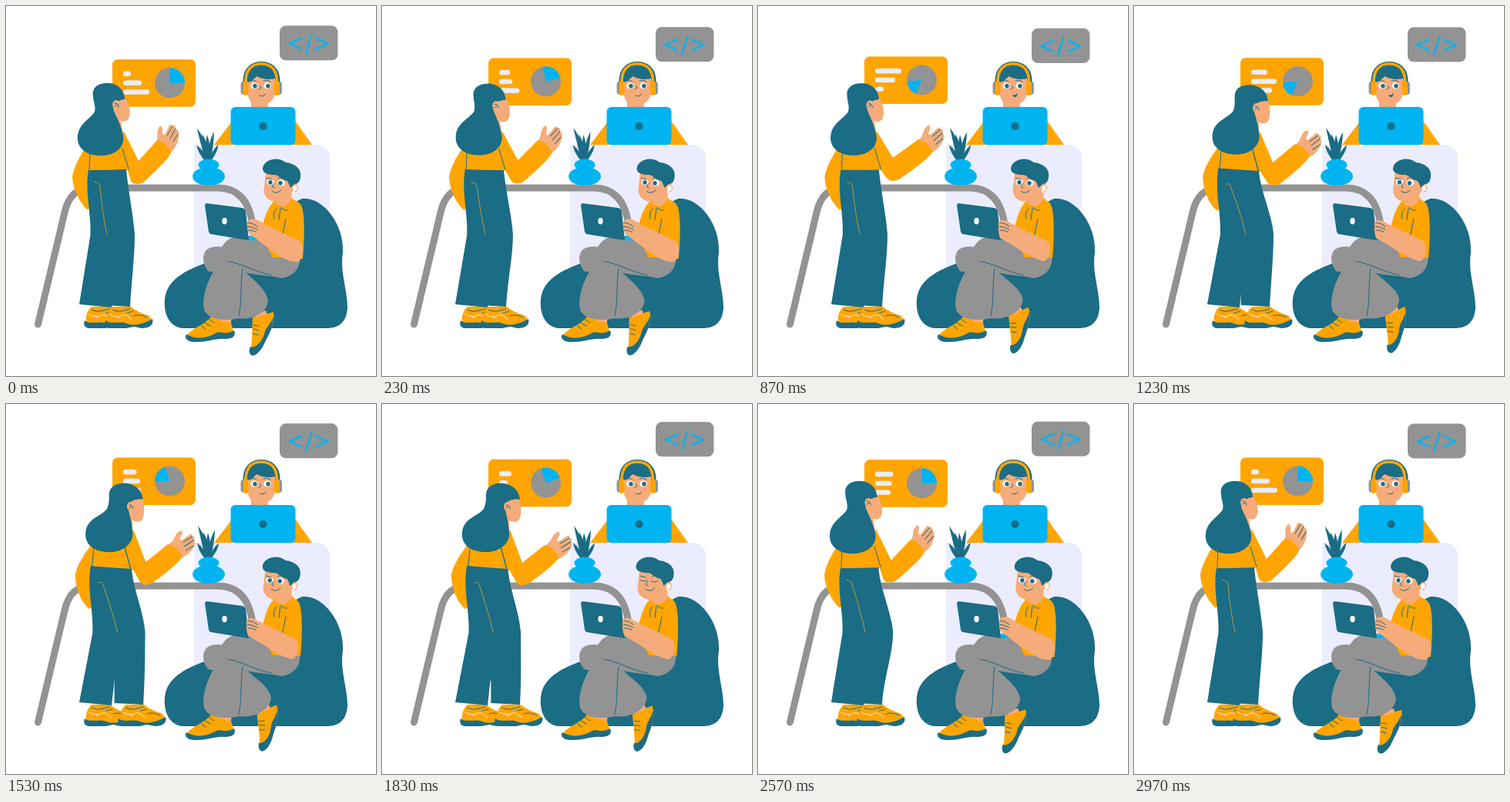
An HTML page with a canvas that plays this animation: 480 px wide and 480 px high, repeating every 3000 ms.

```html
<!DOCTYPE html>
<html>
<head>
<meta charset="utf-8">
<style>
html, body { margin: 0; width: 100%; height: 100%; overflow: hidden; background: #fff }
canvas { display: block; width: 480px; height: 480px }
</style>
</head>
<body>
<canvas id="stage" width="480" height="480"></canvas>
<script>
const ctx = document.getElementById('stage').getContext('2d');
const ORANGE = '#ffa502', TEAL = '#1b6c85', BLUE = '#00b4f2', GREY = '#939393',
      PALE = '#ebedfe', SKIN = '#f6ac7a', WHITE = '#fff';
const LOOP = 3000, TIMES = [0, 470, 870, 1230, 1830, 2230];
let t = 0;

const fill = (d, color) => { ctx.fillStyle = color; ctx.fill(new Path2D(d)); };
const line = (d, color = TEAL, w = 1) => {
  ctx.strokeStyle = color; ctx.lineWidth = w; ctx.stroke(new Path2D(d));
};
const oval = (x, y, rx, ry, color) => {
  ctx.beginPath(); ctx.ellipse(x, y, rx, ry, 0, 0, 7); ctx.fillStyle = color; ctx.fill();
};
const box = (x, y, w, h, r, color) => {
  ctx.beginPath(); ctx.roundRect(x, y, w, h, r); ctx.fillStyle = color; ctx.fill();
};
const placed = (x, y, angle, draw) => {
  ctx.save(); ctx.translate(x, y); ctx.rotate(angle * Math.PI / 180); draw(); ctx.restore();
};

// Looping monotone spline through one value per entry in TIMES
function at(...v) {
  const n = TIMES.length, wrap = j => (j + n) % n;
  const x = j => TIMES[wrap(j)] + LOOP * Math.floor(j / n), y = j => v[wrap(j)];
  const slope = j => (y(j + 1) - y(j)) / (x(j + 1) - x(j));
  const tangent = j => {
    const a = slope(j - 1), b = slope(j);
    return a * b > 0 ? 2 * a * b / (a + b) : 0;
  };
  const i = TIMES.findLastIndex(k => k <= t), h = x(i + 1) - x(i), u = (t - x(i)) / h, r = 1 - u;
  return y(i) * r * r * (1 + 2 * u) + y(i + 1) * u * u * (3 - 2 * u)
    + h * u * r * (tangent(i) * r - tangent(i + 1) * u);
}

// Blend two paths of the same structure
function mix(a, b, k) {
  const to = b.match(/-?[\d.]+/g);
  let i = 0;
  return a.replace(/-?[\d.]+/g, m => +m + (to[i++] - m) * k);
}

const openness = mid => Math.min(1, Math.max(0, (Math.abs(t - mid) - 60) / 60));

function eye(x, y, open, look) {
  if (open < .3) return line(`M${x - 5} ${y}q5 3 9 0`);
  oval(x, y, 4.8, 3.9 * open, WHITE);
  oval(x + look, y + .3, 2.7, 2.8 * open, TEAL);
}

function codeCard(wave) {
  const y = 25.6 + 3.6 * wave, s = 1 + wave * .7;
  box(355, y, 75.5, 45, 8, GREY);
  const c = y + 23;
  line(`M${384 - s} ${c - 7}L${369 - s} ${c}L${384 - s} ${c + 7}M${401 + s} ${c - 7}L${416 + s} ${c}L${401 + s} ${c + 7}`, BLUE, 2.5);
  line(`M396.5 ${c - 11.5}L389 ${c + 12.5}`, BLUE, 2.3);
}

function chartCard(wave) {
  const y = 69.3 - 3.9 * wave;
  box(138, y, 108, 61.5, 7, ORANGE);
  [at(10, 22, 34, 21, 16, 33), at(24, 10, 26, 33, 11, 18), at(34, 16, 11, 27, 16, 10)]
    .forEach((w, i) => box(152, y + 15.5 + i * 11.8, w, 6.4, 3.2, PALE));
  const cx = 212.5, cy = y + 30.5, rad = Math.PI / 180;
  oval(cx, cy, 19.5, 19.5, GREY);
  const from = (at(0, -37, -155, -155, -18, 0) - 90) * rad;
  ctx.beginPath();
  ctx.moveTo(cx, cy);
  ctx.arc(cx, cy, 19.5, from, from + at(90, 80, 60, 60, 88, 90) * rad);
  ctx.fillStyle = BLUE;
  ctx.fill();
}

function coder() {
  fill('M270 180L293 150L375 149L397 180Z', ORANGE);
  box(304.5, 98, 8, 17, 4, GREY);
  box(350, 98, 8, 17, 4, GREY);
  fill('M308 103C305 84 316 72 331 72C347 72 358 84 355 103Z', TEAL);
  fill('M313 99C318 98 322 95 325 91C332 95 342 96 349 94L350 107C350 119 343 126 340 126L340 133L318 133L318 125C314 120 312 110 313 99Z', SKIN);
  line('M311 102C310 85 317 75 331 75C346 75 353 86 351 102', ORANGE, 3.6);
  box(307.5, 97, 7, 19, 3.5, ORANGE);
  box(348, 97, 7, 19, 3.5, ORANGE);
  const open = openness(470);
  eye(322, 103.5, open, 1);
  eye(339, 103.5, open, 1);
  line('M316 98q5-3 9 0M334 97q5-2 9 1M330 104q2 3-2 4');
  if (t > 700 && t < 1500) fill('M329 115Q333 117 337 113Q336 119 332 118Z', TEAL);
  else line('M329 116Q333 119 337 114');
  box(291.5, 131, 84, 49.2, 6, BLUE);
  oval(333.5, 156, 5, 5, TEAL);
}

function plant() {
  placed(262, 200, at(-2, 0, 0, 0, 0, -1), () => {
    for (const [x, y, bend] of [[-13, -42, -5], [-6, -34, -3], [0, -33, 0], [9, -37, 4], [14, -20, 9], [-14, -20, -9]])
      fill(`M${bend * .3 - 2} 0Q${bend - 4} ${y * .55} ${x} ${y}Q${bend + 5} ${y * .6} ${bend * .3 + 2} 0Z`, TEAL);
  });
  oval(263, 206, 13.5, 7.5, BLUE);
  oval(263, 221, 21, 12, BLUE);
}

function seated() {
  const foot = at(0, .4, .9, 1, .85, .2), lean = at(0, .1, 1, 1, .9, .1);
  fill('M206 380C209 352 240 340 266 331L340 330C352 290 362 258 384 250C410 247 439 282 437 320C433 345 443 368 443 391C442 410 432 418 416 418L230 418C213 417 204 401 206 380Z', TEAL);

  // far and near legs with their shoes
  fill('M262 344C254 334 254 320 262 315C270 310 282 312 290 315L282 348Z', GREY);
  fill('M274 400L294 400L291 414L276 413Z', SKIN);
  fill('M267 402C278 407 282 411 292 411L296 425Q284 434 263 432L235 430C234 420 256 416 267 402Z', ORANGE);
  fill('M234 426C247 433 260 431 271 425C278 420 282 428 296 421Q300 431 285 432C268 431 266 436 246 436C234 436 231 430 234 426Z', TEAL);
  line('M258 411l7 4M263 406l7 5M254 415l5 4');
  placed(329 + 5 * foot, 400 - 4 * foot, -9 * foot, () => {
    fill('M-7-2L8-5L11 4L-4 10Z', SKIN);
    fill('M-9 2C-2 7 6-1 18-3Q20 8 14 22L2 45L-12 47C-9 34-10 18-9 2Z', ORANGE);
    fill('M18 3C18 18 11 27 7 36C3 46-4 53.5-9 53.5C-14 53-14 46-12 42C-6 45 3 36 6 26C8 16 14 14 18 3Z', TEAL);
    line('M-8 14l7 1M-8 19l7 2M-9 25l7 2');
  });
  fill(mix('M302 335C314 352 338 364 340 383C338 398 320 408 300 405L288 360Z',
           'M302 335C316 352 341 364 344 380C344 396 324 408 300 405L288 360Z', foot), GREY);
  fill('M297 299C279 304 272 326 270 343C259 361 253 384 258 396C264 408 288 409 301 405C306 388 307 364 307 344C316 349 340 349 357 353C375 351 383 337 381 326L334 298Z', GREY);
  line('M289 331C310 336 326 346 344 349M307 341C304 360 306 385 302 402');

  // shirt
  fill('M315 298L328 299L327 304L314 304Z', BLUE);
  fill(mix('M349 253C340 258 334 278 330 295L346 326L385 328C387 305 388 274 384 261C381 251 366 247 349 253Z',
           'M349 253C340 258 335 278 331 295L346 326L382 327C384 305 385 274 381 260C378 251 366 247 349 253Z', lean), ORANGE);
  line('M363 276C361 288 358 297 357 307');

  // head
  const dx = at(0, -4, -4, 1.5, -3, -.5), hair = at(0, -5, -5, 3, -3.5, -1);
  fill('M352 242L370 240L371 254Q360 264 350 257Z', SKIN);
  fill('M348 253Q353 262 357 260Q364 261 372 249Q378 259 367 266L356 263L345 267Q342 259 348 253Z', ORANGE);
  line('M351 263Q346 268 348 276M356 262L354 277M357 262Q362 266 365 265');
  ctx.save();
  ctx.translate(dx, 0);
  fill('M337 217L372 216Q376 232 371 241C365 251 354 256 345 253C336 250 333 241 335 234Z', SKIN);
  oval(374.5, 236, 4.5, 5.5, SKIN);
  const open = openness(1830);
  eye(343, 228.5, open, 0);
  eye(357, 229.5, open, -1);
  line('M338 223l7 2M353 224q4-3 8 0M348 230q-5 5 0 6M345 240Q350 245 357 239');
  oval(375, 236.5, 2.8, 3.4, WHITE);
  line('M374 238l-1 3', WHITE, 1.8);
  ctx.translate(hair - dx, 0);
  fill('M333 211C334 199 352 194 363 203C373 204 384 210 382 222C381 230 377 231 374 231L369 236Q367 230 365 227C357 226 354 219 348 219C340 219 333 217 333 211Z', TEAL);
  ctx.restore();

  // laptop and forearm
  fill('M261 256L307 262Q310 263 311 266L315 304L266 296Q264 296 263 293L258 259Q258 256 261 256Z', TEAL);
  oval(283.5, 279, 3.2, 4.2, WHITE);
  fill('M315 298Q326 298 327 303L315 304Z', BLUE);
  fill(mix('M313 280C318 273 328 277 335 283L383 306C387 318 386 328 378 332C366 333 352 322 340 314L322 300Q311 296 313 280Z',
           'M312 280C316 275 324 279 330 283L377 306C380 316 379 328 371 331C358 329 342 318 330 310L314 301Q311 294 312 280Z', lean), SKIN);
  line('M314 281q6 0 12 5M313 286q6 0 13 4M314 291q5-1 10 2');
}

function shoe(x) {
  placed(x, 0, 0, () => {
    fill('M3 410C2 399 6 394 10 390L34 390C41 396 49 399 56 401Q62 405 61 411L30 416L4 414Z', ORANGE);
    fill('M1 408C8 414 20 408 29 412C39 416 51 412 62 406C64 414 58 418 48 418L38 416L28 418L6 418C1 417-1 413 1 408Z', TEAL);
    line('M17 405Q26 395 35 407M7 400q6 4 11 3', PALE);
    line('M25 395l8-2M29 398l8-2M38 402q8-3 17 2M10 394q8 4 15 1');
  });
}

function woman() {
  const sway = at(0, .53, .12, .8, 1, .06);
  const pose = (a, b) => mix(a, b, sway);
  const knee = at(167, 173, 168, 181, 180, 181), step = at(0, 0, 0, 15, 18, 0);
  const left = 107 + 3 * sway, right = 156 + 7.5 * sway;

  fill(pose('M104 182C95 195 87 212 86 222C87 238 95 254 105 264L112 262L110 213Z',
            'M110 184C100 197 91 212 90 222C90 238 97 257 108 266L114 262L116 211Z'), ORANGE);
  fill(pose('M106 180L99 193L107 214L158 213L157 175L152 163L140 160Z',
            'M112 180L104 196L110 212L165 216L167 178L165 163L150 160Z'), ORANGE);

  shoe(101);
  shoe(128 + step);
  fill(`M${left} ${213 - 3 * sway}C${left - 5} 240 ${left + 4} 270 ${left + 2.5} 297L95 387L137 391L141 355L152 300L${right} 214Z`, TEAL);
  fill(`M${left} ${213 - 3 * sway}Q${left + 24} 213 ${right} ${212 + 4 * sway}C${right + 3} 243 ${knee - 2} 270 ${knee} 296C${knee} 325 ${163 + step} 355 ${161 + step} 390L${126 + step * .85} 388L${126 + step * .85} 360L120 300Z`, TEAL);
  const seam = 131 + (knee - 167);
  line(`M${115 + 5 * sway} ${228 + 4 * sway}Q${121 + 5 * sway} 229 ${122 + 5 * sway} ${234 + 3 * sway}Q${seam - 6} 270 ${seam} 296`, '#b69a3b');
  line(pose('M109 188L108 212M151 185L159 212', 'M114 188L112 211M154 185L162 215'));

  // front arm and hand
  const cx = at(205, 218, 217, 218, 220, 210), cy = at(183, 183, 182, 188, 192, 188);
  const ex = at(168, 179, 173, 179, 180, 170), ey = at(230, 228, 226, 232, 234, 231);
  const ix = at(172, 181, 175, 180, 182, 174), iy = at(201, 199, 197, 203, 206, 204);
  const sx = 153 + 13 * sway;
  placed(cx, cy, at(0, 24, 20, 24, 30, 22), () => {
    fill('M-11-4C-6-12-11-18-7-25Q-4-30-2-24L-2-17Q0-14 2-18L7-28Q10-31 11-27Q15-30 15-24Q20-22 19-14C18-4 14 2 8 8Z', SKIN);
    line('M4-15L11-27M8-11L15-24M12-7L18-17');
  });
  fill(`M${sx} 163L${ix} ${iy}L${cx - 9} ${cy - 9}Q${cx + 5} ${cy - 5} ${cx + 9} ${cy + 7}Q${cx + 8} ${cy + 14} ${ex + 10} ${ey - 1}Q${ex - 1} ${ey + 4} ${ex - 6} ${ey - 3}L${right + 1} ${211 + 3 * sway}L${sx - 6} 186Z`, ORANGE);
  line(pose('M151 185L159 211', 'M154 185L162 214'));

  // head
  fill(pose('M138 120L154 119C160 126 162 136 160 143C159 150 152 151 149 148L152 168L138 168Z',
            'M157 122L178 121C181 128 181 142 179 148C177 154 170 154 165 151L165 168L154 168Z'), SKIN);
  fill(pose('M113 117C111 104 122 99 134 100C146 101 154 110 154 121C146 122 140 126 139 134C142 142 148 150 152 168C155 185 138 195 122 194C104 194 91 184 93 168C95 152 110 146 115 137C117 130 113 124 113 117Z',
            'M135 118C135 107 145 102 157 103C170 104 178 113 179 124C170 122 160 126 159 134C161 142 164 152 165 166C167 182 150 193 134 192C116 192 102 183 104 166C106 148 124 146 132 136C135 130 135 124 135 118Z'), TEAL);
  const x = 143 + 20 * sway, y = 128 + 5 * sway;
  oval(x, y, 5, 6, SKIN);
  line(`M${x - 2} ${y - 2}q5 0 5 5M${x - 2} ${y + 2}l3-2`);
}

function draw(now) {
  t = now % LOOP;
  const wave = Math.sin(2 * Math.PI * t / LOOP);
  ctx.fillStyle = WHITE;
  ctx.fillRect(0, 0, 480, 480);
  ctx.lineCap = 'round';
  codeCard(wave);
  chartCard(wave);
  box(244, 180, 176, 200, [0, 17, 0, 0], PALE);
  coder();
  line('M41.5 413L76 268Q83 236 110 236L276 236Q314 237 320 285', GREY, 9);
  plant();
  seated();
  woman();
  requestAnimationFrame(() => draw(performance.now() - start));
}
const start = performance.now();
draw(0);
</script>
</body>
</html>
```
